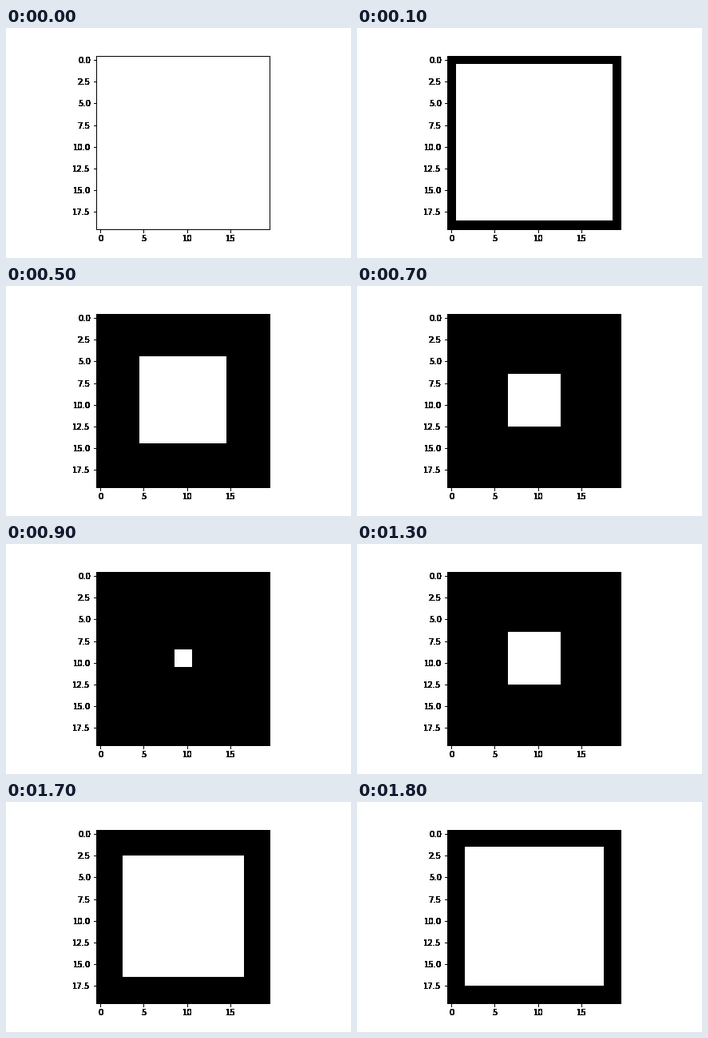
A matplotlib script that plays this animation: 432 px wide and 288 px high, repeating every 1900 ms.

```python
import matplotlib.pyplot as plt
import numpy as np
from matplotlib.animation import FuncAnimation
from matplotlib.axes import Axes

SIZE = 20
HALF = SIZE // 2
FRAMES = 2 * HALF - 1
INTERVAL = 100
PASSES = 24


class InkedAxes(Axes):
    """Axes whose frame and labels are drawn repeatedly, for solid black edges."""

    def draw(self, renderer):
        super().draw(renderer)
        for _ in range(PASSES):
            for artist in (self.xaxis, self.yaxis, *self.spines.values()):
                artist.draw(renderer)


def square(border):
    """White square inside a black border of the given width in cells."""
    grid = np.zeros((SIZE, SIZE))
    grid[border:SIZE - border, border:SIZE - border] = 1
    return grid


plt.rcParams["font.family"] = "DejaVu Sans"
fig = plt.figure(figsize=(6, 4), dpi=72, facecolor="white")
fig.subplots_adjust(left=0.125, right=0.9, bottom=0.125, top=0.88)
ax = fig.add_subplot(axes_class=InkedAxes)
image = ax.imshow(square(0), cmap="gray", vmin=0, vmax=1, interpolation="nearest")
ax.set_xticks(np.arange(0, SIZE, 5))
ax.set_yticks(np.arange(0, SIZE, 2.5))


def update(i):
    # The border closes to full black, then opens again.
    image.set_data(square(HALF - abs(HALF - i)))
    return [image]


anim = FuncAnimation(fig, update, frames=FRAMES, interval=INTERVAL,
                     repeat=True, repeat_delay=0, blit=False)
plt.show()
```
